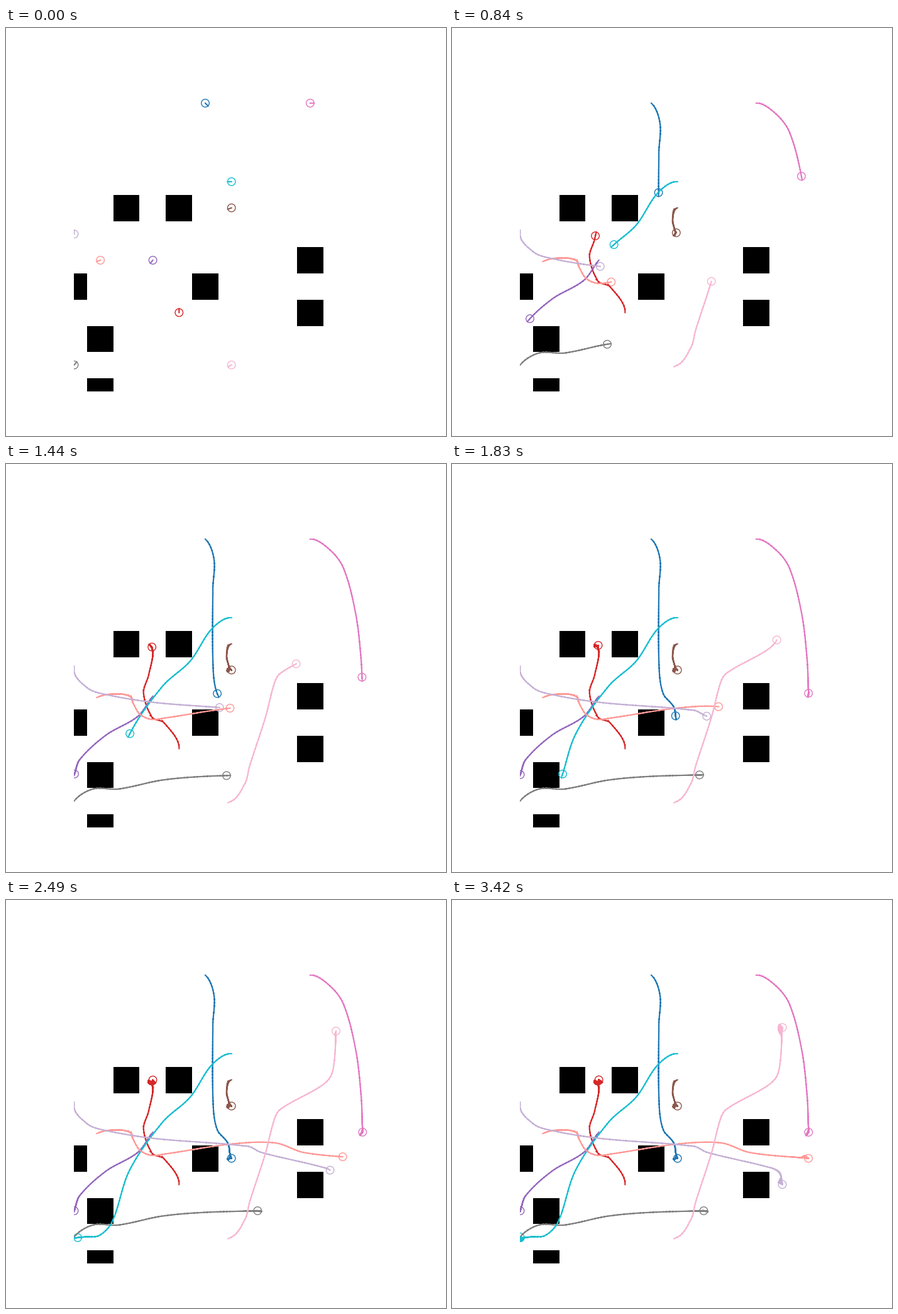
Animation, 700 px wide and 650 px high, one loop 3450 ms. Source, as a matplotlib script:

```python
import matplotlib.pyplot as plt
import numpy as np
from matplotlib.animation import FuncAnimation
from matplotlib.patches import Circle

FRAMES, INTERVAL = 115, 30
SIZE = 12
RADIUS = 0.15
SPEED = 0.125      # cells per frame
GAIN = 0.15        # braking near the goal
TURN_RATE = 5      # degrees per frame when turning on the spot
LAUNCH = 1.5       # distance over which a slow start lasts

fig, ax = plt.subplots(figsize=(7, 6.5), dpi=100)
grid = np.zeros((SIZE + 1, SIZE + 1))
for col, row in [(2, 5), (4, 5), (9, 7), (0, 8), (5, 8), (9, 9), (1, 10), (1, 12)]:
    grid[row, col] = 1
ax.imshow(grid, cmap="gray_r", zorder=0)
ax.set_xlim(0, SIZE)
ax.set_ylim(SIZE, 0)
ax.axis("off")


def smooth(points, direction, n=1500):
    """Cubic curve through the points that leaves the first one along direction."""
    p = np.array(points, float)
    t = np.r_[0, np.cumsum(np.hypot(*np.diff(p, axis=0).T))]
    m = np.empty_like(p)
    m[0] = np.cos(direction), np.sin(direction)
    m[1:-1] = (p[2:] - p[:-2]) / (t[2:] - t[:-2])[:, None]
    m[-1] = (p[-1] - p[-2]) / (t[-1] - t[-2])

    x = np.linspace(0, t[-1], n)
    k = np.clip(np.searchsorted(t, x, side="right") - 1, 0, len(t) - 2)
    h = (t[k + 1] - t[k])[:, None]
    u = (x - t[k])[:, None] / h
    return ((1 + 2 * u) * (1 - u) ** 2 * p[k] + u * (1 - u) ** 2 * h * m[k]
            + u ** 2 * (3 - 2 * u) * p[k + 1] + u ** 2 * (u - 1) * h * m[k + 1])


def travel(length, pace):
    """Distance per frame: cruise, then slow down in proportion to what is left."""
    s, out = 0.0, []
    for _ in range(FRAMES):
        out.append(s)
        cruise = SPEED * (pace if s < LAUNCH else 1)
        s += min(cruise, GAIN * (length - s))
    return np.array(out)


def plan(start, heading, via, goal, turn, reverse, pace):
    """Drive through the via points, then turn on the spot while sliding onto the goal."""
    flip = 180 * reverse
    curve = smooth([start] + via, np.radians(heading - flip))
    arc = np.r_[0, np.cumsum(np.hypot(*np.diff(curve, axis=0).T))]
    s = travel(arc[-1], pace)
    dx, dy = np.gradient(curve, axis=0).T
    tangent = np.unwrap(np.arctan2(dy, dx))
    x, y, angle = (np.interp(s, arc, v) for v in (*curve.T, tangent))

    arrival = np.argmax(arc[-1] - s < RADIUS)
    swept = np.clip((np.arange(FRAMES) - arrival) * TURN_RATE / abs(turn), 0, 1)
    slide = np.subtract(goal, via[-1])
    center = np.column_stack([x, y]) + swept[:, None] * slide
    return center, angle + np.radians(flip + turn * swept)


robots = []


def add_robot(color, start, heading, goal, via, turn=10, reverse=False, pace=1):
    center, angle = plan(start, heading, via, goal, turn, reverse, pace)
    tip = center + RADIUS * np.column_stack([np.cos(angle), np.sin(angle)])
    needles = np.stack([center, tip, np.full_like(tip, np.nan)], axis=1)
    body = ax.add_patch(Circle(center[0], RADIUS, fill=False, ec=color, lw=1, zorder=1))
    trail, = ax.plot([], [], color=color, lw=1.5, zorder=2)
    robots.append((body, trail, center, needles))


add_robot("#1f77b4", (5, 1), 45, (6, 8),
          [(5.33, 1.77), (5.29, 2.9), (5.3, 5.92), (5.45, 6.88), (5.85, 7.41),
           (5.95, 7.9)], turn=95)
add_robot("#d62728", (4, 9), 270, (3, 5),
          [(3.44, 8.03), (2.98, 7.8), (2.65, 6.9), (2.83, 6.22), (3, 5.42),
           (2.95, 5.1)], turn=-225)
add_robot("#9467bd", (3, 7), 130, (0, 10),
          [(2.42, 7.77), (1.21, 8.49), (0.23, 9.4), (0, 10)])
add_robot("#8c564b", (6, 5), 160, (6, 6),
          [(5.82, 5.4), (5.92, 5.95)], turn=115, pace=0.47)
add_robot("#e377c2", (9, 1), 0, (11, 7),
          [(9.73, 1.39), (10.27, 2.11), (10.73, 3.81), (10.94, 5.56), (11, 6.95)],
          turn=40)
add_robot("#7f7f7f", (0, 11), 310, (7, 10),
          [(0.71, 10.55), (1.71, 10.54), (3.32, 10.21), (4.83, 10.07), (7, 10)])
add_robot("#17becf", (6, 4), 180, (0, 11),
          [(5.26, 4.42), (4.42, 5.66), (3.37, 6.62), (2.12, 8.44), (1.45, 10.41),
           (0.97, 10.93), (0.4, 11), (0, 11.04)], turn=-160)
add_robot("#ff9896", (1, 7), 160, (11, 8),
          [(1.76, 6.92), (2.16, 7.04), (2.27, 7.31), (2.53, 7.7), (2.96, 7.88),
           (3.54, 7.82), (6.01, 7.45), (7.66, 7.41), (8.79, 7.78), (11, 8)],
          turn=30, reverse=True, pace=0.74)
add_robot("#c5b0d5", (0, 6), 270, (10, 9),
          [(0.52, 6.69), (1.23, 6.94), (3.08, 7.24), (6.61, 7.54), (7.17, 7.78),
           (9.58, 8.37), (9.9, 8.58), (10, 9)], turn=-50, reverse=True)
add_robot("#f7b6d2", (6, 11), 153, (10, 3),
          [(6.52, 10.31), (6.7, 9.64), (7.29, 7.82), (7.65, 6.47), (7.9, 6.1),
           (9.36, 5.27), (9.77, 4.88), (9.92, 4.29), (9.99, 3.06)],
          turn=130, reverse=True)


def update(i):
    for body, trail, center, needles in robots:
        body.center = center[i]
        trail.set_data(*needles[:i + 1].reshape(-1, 2).T)
    return [artist for robot in robots for artist in robot[:2]]


anim = FuncAnimation(fig, update, frames=FRAMES, interval=INTERVAL,
                     repeat=True, repeat_delay=0, blit=False)
plt.show()
```
